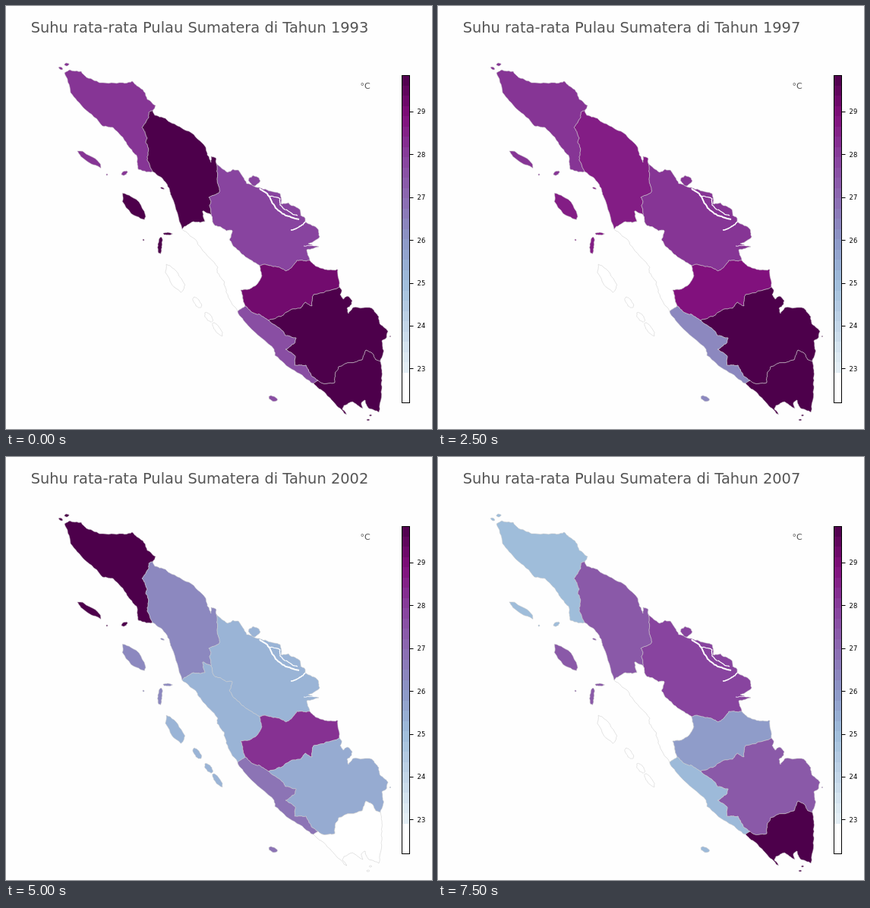
An HTML page that plays this animation: 561x557 px, repeating every 8 s.

```html
<!DOCTYPE html>
<html lang="id">
<head>
<meta charset="utf-8">
<style>
html, body { margin: 0; width: 100%; height: 100%; overflow: hidden; background: #fefefe; }
svg { display: block; font-family: "DejaVu Sans", sans-serif; }
</style>
</head>
<body>
<svg id="stage" width="561" height="557" viewBox="0 0 561 557">
  <text id="title" x="32.7" y="35" font-size="19.41" fill="#555"></text>
  <g id="map" stroke="#ccc" stroke-width=".55" stroke-linejoin="round"></g>
  <g id="channels" fill="none" stroke="#fefefe" stroke-linejoin="round"></g>
  <text x="466.5" y="109" font-size="11.1" fill="#555">°C</text>
  <g id="bar"></g>
</svg>
<script>
const $ = id => document.getElementById(id);

function add(parent, tag, attrs, text) {
  const el = document.createElementNS('http://www.w3.org/2000/svg', tag);
  for (const k in attrs) el.setAttribute(k, attrs[k]);
  if (text) el.textContent = text;
  parent.appendChild(el);
  return el;
}

// Colour scale from pale blue to deep purple; the lowest tenth is white
const ramp = ['f7fcfd', 'e0ecf4', 'bfd3e6', '9ebcda', '8c96c6', '8c6bb1', '88419d', '810f7c', '4d004b']
  .map(h => [0, 2, 4].map(i => parseInt(h.substr(i, 2), 16)));

function colour(v) {
  if (v < .1) return '#fff';
  const x = v * 8, i = Math.min(7, Math.floor(x));
  return `rgb(${ramp[i].map((c, k) => Math.round(c + (ramp[i + 1][k] - c) * (x - i)))})`;
}

// Seeded midpoint displacement gives the coasts their ragged look
let seed = 7;
const rand = () => (seed = seed * 16807 % 2147483647) / 2147483647 - .5;

function roughen(pts, levels = 3) {
  if (!levels) return pts;
  const out = [pts[0]];
  for (let i = 1; i < pts.length; i++) {
    const [ax, ay] = pts[i - 1], [bx, by] = pts[i];
    const amp = Math.min(1.8, Math.hypot(bx - ax, by - ay) * .25);
    out.push([(ax + bx) / 2 + rand() * amp, (ay + by) / 2 + rand() * amp], [bx, by]);
  }
  return roughen(out, levels - 1);
}

const line = s => roughen(s.trim().split(/\s+/).map(p => p.split(',').map(Number)));
const toPath = pts => 'M' + pts.map(p => p.map(n => +n.toFixed(1)).join()).join('L');

// Wobbly ellipse: centre, length, width, tilt in degrees
function isle([x, y, length, width, tilt]) {
  const a = tilt * Math.PI / 180, pts = [];
  for (let i = 0; i < 14; i++) {
    const t = i * Math.PI / 7, r = 1 + rand() * .3;
    const u = Math.cos(t) * r * length / 2, v = Math.sin(t) * r * width / 2;
    pts.push([x + u * Math.cos(a) - v * Math.sin(a), y + u * Math.sin(a) + v * Math.cos(a)]);
  }
  return roughen([...pts, pts[0]], 1);
}

// Key points of the coasts and shared borders
const lines = {
  acehCoast: line(`193,218 174,215 173,200 164,188 155,175 141,160 127,158 103,135 85,114 77,88 84,84 99,86
    106,94 123,101 154,101 166,99 172,105 183,114 186,123 197,131 193,138`),
  acehSumut: line('193,138 188,140 188,147 179,160 186,174 184,180 187,186 186,203 193,218'),
  sumutEast: line('193,138 196,144 210,148 216,153 241,165 263,186 265,196 270,206 270,198 277,201 277,207'),
  sumutRiau: line('277,207 278,228 281,245 267,252 270,258 268,263 270,275'),
  sumutSumbar: line('270,275 259,270 262,284 247,284 232,294'),
  sumutWest: line('232,294 219,253 215,240 208,230 193,218'),
  riauCoast: line(`277,207 292,219 299,215 306,216 317,234 336,240 345,243 361,247 363,261 372,259 387,268
    388,276 393,278 394,284 411,294 413,304 398,313 412,317 396,321 400,335`),
  riauJambi: line('400,335 383,335 377,343 369,349 355,343 341,340 334,342'),
  riauSumbar: line('270,275 274,288 283,291 290,296 298,296 294,308 300,317 318,332 334,342'),
  sumbarJambi: line('334,342 337,355 331,366 322,372 309,374 315,395'),
  sumbarBengkulu: line('315,395 305,402'),
  sumbarCoast: line('232,294 249,307 257,319 279,344 278,351 287,362 290,377 305,402'),
  jambiCoast: line('400,335 409,343 422,347 437,347 439,370'),
  jambiSumsel: line('439,370 405,380 403,395 394,390 388,398 375,400 362,409 346,414'),
  jambiBengkulu: line('315,395 325,404 334,406 346,414'),
  bengkuluSumsel: line('346,414 363,427 368,434 382,437 379,445 368,452 381,461 380,473 395,473 403,488 411,493'),
  bengkuluCoast: line('305,402 319,421 353,452 354,460 380,480 405,497'),
  bengkuluLampung: line('411,493 405,497'),
  sumselLampung: line('411,493 417,497 433,496 434,482 438,475 469,466 474,453 483,458 487,466 493,468'),
  sumselCoast: line(`439,370 442,374 440,380 444,386 449,382 456,388 455,393 449,398 451,405 457,397 482,398
    491,409 492,418 503,428 501,437 495,441 497,456 493,468`),
  lampungCoast: line(`493,468 495,482 495,504 491,535 478,530 473,519 468,523 470,530 456,521 445,526
    443,531 449,538 436,527 416,506 405,497`)
};

// A minus sign walks the line backwards
const regions = [
  { ring: 'acehCoast acehSumut',
    isles: [[111, 202, 36, 8, 33], [156, 220, 8, 5, -30], [80, 77, 6, 4, 0], [72, 82, 6, 3, 30], [133, 222, 2, 2, 0]] },
  { ring: 'sumutEast sumutRiau sumutSumbar sumutWest acehSumut-',
    isles: [[168, 264, 44, 17, 50], [213, 300, 12, 3, 0], [203, 316, 21, 6, 95], [181, 308, 2, 2, 0], [206, 240, 5, 2, 20]] },
  { ring: 'riauCoast riauJambi riauSumbar- sumutRiau-', isles: [[327, 230, 14, 13, 0]] },
  { ring: 'sumutSumbar- riauSumbar sumbarJambi sumbarBengkulu sumbarCoast-',
    isles: [[223, 359, 40, 15, 58], [252, 391, 17, 7, 55], [267, 410, 14, 7, 50], [278, 425, 22, 7, 55]] },
  { ring: 'jambiCoast jambiSumsel jambiBengkulu- sumbarJambi- riauJambi-', isles: [] },
  { ring: 'sumselCoast sumselLampung- bengkuluSumsel- jambiSumsel-', isles: [[506, 435, 2, 1, 0]] },
  { ring: 'jambiBengkulu bengkuluSumsel bengkuluLampung bengkuluCoast- sumbarBengkulu-',
    isles: [[351.5, 517, 12, 6, 25]] },
  { ring: 'sumselLampung lampungCoast bengkuluLampung-', isles: [[477, 545, 4, 2, 0], [480, 539, 3, 2, 0]] }
];

for (const r of regions) {
  const ring = r.ring.split(' ').flatMap(n =>
    n.endsWith('-') ? [...lines[n.slice(0, -1)]].reverse() : lines[n]);
  r.el = add($('map'), 'path', { d: [ring, ...r.isles.map(isle)].map(p => toPath(p) + 'Z').join('') });
}

// Straits and river mouths on the east coast
const channels = {
  '334,240 344,247 355,266 366,274 386,281': 2,
  '344,249 361,254 361,262 367,268 384,276': 1.2,
  '375,295 387,290 394,284': 1.6,
  '392,316 412,314': .8
};
for (const c in channels) add($('channels'), 'path', { d: toPath(line(c)), 'stroke-width': channels[c] });

// Known warmth by year, in the order of the regions
const heat = {
  1993: [.78, 1, .74, 0, .91, 1, .71, 1],
  1995: [.82, 1, .78, 0, .82, 1, .73, .92],
  1997: [.78, .84, .78, 0, .87, 1, .54, 1],
  2000: [.71, .87, .45, .4, .9, .28, 0, 1],
  2002: [1, .54, .4, .4, .79, .43, .6, 0],
  2004: [.61, .49, 1, .28, .22, 0, .87, .84],
  2007: [.37, .68, .74, 0, .48, .68, .38, 1]
};

// Blend neighbouring years, then stretch so the coolest is 0 and the warmest 1
function heatIn(year) {
  let a = year, b = year;
  while (!heat[a]) a--;
  while (!heat[b]) b++;
  const mix = a === b ? 0 : (year - a) / (b - a);
  const raw = heat[a].map((v, i) => v + (heat[b][i] - v) * mix);
  const low = Math.min(...raw), high = Math.max(...raw);
  return raw.map(v => (v - low) / (high - low));
}

// Colour bar
const bands = 32, step = 432 / bands;
for (let i = 0; i < bands; i++) {
  add($('bar'), 'rect', { x: 521, y: 91 + i * step, width: 11, height: step,
    fill: colour(1 - (i + .5) / bands), 'shape-rendering': 'crispEdges' });
}
add($('bar'), 'rect', { x: 521.5, y: 91.5, width: 10, height: 431, fill: 'none', stroke: '#000' });
for (let d = 23; d <= 29; d++) {
  const y = 139.5 + (29 - d) * 56.4;
  add($('bar'), 'path', { d: `M532 ${Math.floor(y) + .5}h4.5`, stroke: '#000' });
  add($('bar'), 'text', { x: 541.6, y: y + 2.9, 'font-size': 8.33 }, d);
}

let shown;
function draw(ms) {
  const year = 1993 + Math.max(0, Math.floor(ms % 8000 / 500) - 1);
  if (year === shown) return;
  shown = year;
  $('title').textContent = 'Suhu rata-rata Pulau Sumatera di Tahun ' + year;
  heatIn(year).forEach((v, i) => regions[i].el.setAttribute('fill', colour(v)));
}

const start = performance.now();
function tick() {
  draw(performance.now() - start);
  requestAnimationFrame(tick);
}
tick();
</script>
</body>
</html>
```
